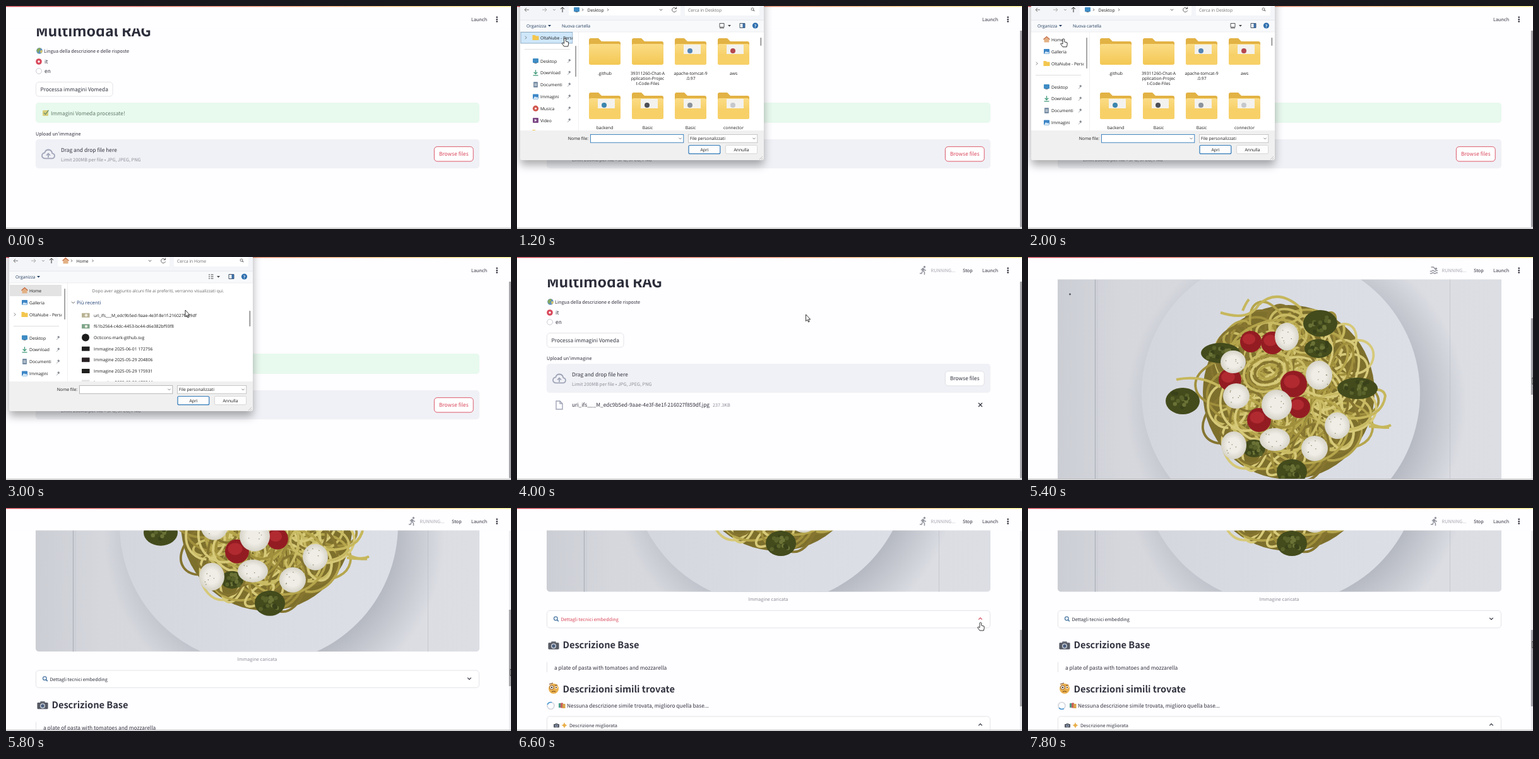
An HTML page that plays this animation: 800 px wide and 353 px high, repeating every 8000 ms.

```html
<!DOCTYPE html>
<html lang="it">
<head>
<meta charset="utf-8">
<title>Multimodal RAG</title>
<style>
html, body { margin: 0; width: 100%; height: 100%; overflow: hidden; background: #fefdff; }
svg { display: block; width: 100%; height: 100%; font-family: "Noto Sans CJK JP", "Noto Sans CJK SC", "Noto Sans CJK", sans-serif; }
text { white-space: pre; text-rendering: geometricPrecision; }
#dialog { font-family: "Open Sans", "Noto Sans", sans-serif; }
</style>
</head>
<body>
<svg id="stage" viewBox="0 0 800 353"></svg>
<script>
const INK = '#31333f', GREY = '#8d8f99', RED = '#d8475a', LINE = '#dcdde3';
const BODY = 8.37, SMALL = 7.3, UI = 6.75;

const rect = (x, y, w, h, fill, r = 0, more = '') =>
  `<rect x="${x}" y="${y}" width="${w}" height="${h}" rx="${r}" fill="${fill}" ${more}/>`;
const line = (d, stroke, w = 1, more = '') =>
  `<path d="${d}" fill="none" stroke="${stroke}" stroke-width="${w}" ${more}/>`;
const shape = (d, fill, more = '') => `<path d="${d}" fill="${fill}" ${more}/>`;
const oval = (x, y, rx, ry, fill, more = '') =>
  `<ellipse cx="${x}" cy="${y}" rx="${rx}" ry="${ry}" fill="${fill}" ${more}/>`;
const dot = (x, y, r, fill, more = '') => oval(x, y, r, r, fill, more);
const text = (x, y, size, str, fill = INK, more = '') =>
  `<text x="${x}" y="${y}" font-size="${size}" fill="${fill}" ${more}>${str}</text>`;
const group = (id, inner, more = '') => `<g id="${id}" ${more}>${inner}</g>`;
const box = (x, y, w, h, stroke = LINE, r = 4.7, fill = '#fff') =>
  rect(x, y, w, h, fill, r, `stroke="${stroke}" stroke-width=".8"`);
const chevron = (x, y, dx, dy, color = INK, w = 1.2) =>
  dx > dy ? line(`M${x - dx} ${y - dy}l${dx} ${2 * dy}l${dx} ${-2 * dy}`, color, w)
          : line(`M${x - dx} ${y - dy}l${2 * dx} ${dy}l${-2 * dx} ${dy}`, color, w);
const MID = 'text-anchor="middle"', BOLD = 'font-weight="700"', SEMI = 'font-weight="600"';

// small pictograms
const camera = (x, y, s) => `<g transform="translate(${x} ${y}) scale(${s})">` +
  rect(-4, -7, 8, 4, '#6b6f78', 1) + rect(-9, -5, 18, 11, '#565a64', 1.5) +
  dot(0, .5, 4.2, '#d3d7dd') + dot(0, .5, 2.8, '#4a5f80') + '</g>';
const lens = (x, y, r, color, w) =>
  line(`M${x + r * .6} ${y + r * .6}l${r} ${r}`, color, w * 1.3) +
  dot(x, y, r, 'none', `stroke="${color}" stroke-width="${w}"`);
const globe = dot(53, 71, 4.8, '#5c8fc4') + shape('M49 69q3-4 6-2q-1 4-3 4q1 3-1 3q-3-2-2-5z', '#86a85a') +
  shape('M54 71q3-2 4 0q-1 3-3 4z', '#d9c766');
const face = dot(58, 286, 8, '#eab04e') + dot(55, 284, 3.2, '#fff', 'stroke="#8a5a2b"') +
  dot(62, 284, 2, '#fff') + dot(55, 284, 1.3, '#4a3520') + dot(62, 284, 1.1, '#4a3520') +
  line('M55 291q3-2 6 0', '#7a4a20', 1.2) + line('M51 279l6-2M60 281l4-1', '#7a4a20', 1.2);
const books = rect(66, 309, 4, 7, '#4e9a8a', .6) + rect(69, 308.5, 4, 8, '#c4605c', .6) + rect(72, 310, 4.5, 7, '#d9a44a', .6);
const star = shape('M75 339q.8 4 4.5 5q-3.7 1-4.5 5q-.8-4-4.5-5q3.7-1 4.5-5z', '#e9b04c');

// photo of the dish
let seed = 11;
const rnd = () => (seed = seed * 16807 % 2147483647) / 2147483647;
const around = (c, spread) => (c + (rnd() - .5) * spread).toFixed(1);
const noodle = (x, y, rx, ry, turn, i) => oval(x, y, rx, ry, 'none',
  `stroke="${['#c9bb64', '#a08f3c', '#d6c978', '#857530', '#b5a54c'][i % 5]}" stroke-width="3.8" transform="rotate(${turn} ${x} ${y})"`);
function pasta() {
  let out = oval(413, 214, 136, 138, '#7d6f2c');
  for (let i = 0; i < 120; i++) {
    const a = rnd() * 6.283, rx = 24 + rnd() * 40, d = Math.sqrt(rnd()) * (150 - rx);
    out += noodle((413 + d * Math.cos(a)).toFixed(1), (213 + d * Math.sin(a)).toFixed(1),
      rx.toFixed(1), (rx * (.4 + rnd() * .5)).toFixed(1), Math.round(rnd() * 180), i);
  }
  out += line('M235 194q40-8 70 12M540 262q20 12 35 4M540 268q18 2 32 2M305 88q45 14 60-12q30-28 66 4q8 20-24 26M340 85q5-12 10-18M495 130q8-8 5-22M500 255q60 5 66-35q-2-10-14-10', '#c6b75c', 4);
  for (let i = 0; i < 5; i++) out += noodle(380, 182, 39 - i * 6, 30 - i * 5, -20, i);
  return out;
}
const pesto = [[463,105,27,21],[460,145,22,15],[305,152,31,16],[245,228,27,21],[522,208,32,17],[418,340,24,20],[358,303,18,14]];
const tomatoes = [[353,134,17],[387,136,18],[421,201,21],[430,238,17],[366,258,19],[320,194,18]];
const cheese = [[325,166,20,18],[410,126,19,22],[461,187,21,23],[330,220,21,20],[394,234,24,24],[490,267,20,21],[326,298,20,22],[391,289,24,18],[454,303,21,20]];
const crumbs = (n, [x, y, rx, ry], r, colors) => Array.from({ length: n }, (_, i) =>
  dot(around(x, rx * 1.3), around(y, ry * 1.3), r, colors[i % colors.length])).join('');
const photo = '<g transform="translate(0 237)" clip-path="url(#frame)">' +
  rect(47, 21, 703, 396, 'url(#wood)') +
  line('M106.5 20V420', '#aeb2bb', 1.4) + line('M668.5 20V420M110 20V420', '#c6c9cf') + dot(66.5, 59, 1.4, '#50535c') +
  dot(425, 235, 270, 'url(#shadow)') + dot(400.5, 216, 220.5, 'url(#plate)') +
  pasta() +
  pesto.map(p => oval(...p, '#434b1c') + crumbs(16, p, 3.2, ['#59622a', '#39411a', '#6b7236'])).join('') +
  tomatoes.map(([x, y, r]) => dot(x, y, r, '#931c22') + oval(x - 3, y - 4, r * .6, r * .5, '#b02a30')).join('') +
  cheese.map(c => oval(...c, 'url(#milk)') + crumbs(6, c, .7, ['#7d7a55'])).join('') + '</g>';

// web page
const intro = text(46.9, 47.6, 23.1, 'Multimodal RAG', '#2b2d3a', BOLD) + globe +
  text(60, 74, SMALL, 'Lingua della descrizione e delle risposte') +
  dot(52, 88, 4.8, RED) + dot(52, 88, 1.7, '#fff') + text(61, 91.3, BODY, 'it') +
  dot(52, 103, 4.4, '#fff', 'stroke="#c3c5cd" stroke-width=".9"') + text(61, 106.3, BODY, 'en') +
  box(47.4, 120.4, 121.6, 22.6) + text(54.5, 134.5, BODY, 'Processa immagini Vomeda');
const alertBox = rect(47, 153, 703, 32, '#e8f9ee', 4.7) +
  rect(58, 165, 9, 9, '#d8cf7c', 1.5) + line('M60 169l2.5 2.5l5-6.5', '#71936f', 1.3) +
  text(71, 172.5, BODY, 'Immagini Vomeda processate!', '#5f7a66');
const uploader = text(47, 204.8, SMALL, "Upload un'immagine") + rect(47, 211, 703, 46, '#f0f1f6', 4.7) +
  line('M61.5 241.3q-4.5-.3-4.5-4.5q.2-4 4.300-4.5q1.5-4.800 6-4.800q5 .3 6 5.800q3.700.5 3.700 4q-.3 3.700-3.800 4z'.replace(/00/g, ''), '#a0a5b8', 1.8) +
  line('M67 240v-6.5m-3 3l3-3l3 3', '#a0a5b8', 1.7) +
  text(87, 230.9, BODY, 'Drag and drop file here') +
  text(87, 245.5, SMALL, 'Limit 200MB per file • JPG, JPEG, PNG', GREY) +
  '<rect id="browseBox" x="678.4" y="222.7" width="61.8" height="23.2" rx="4.7" fill="#fff" stroke-width=".9"/>' +
  `<text id="browseText" x="709.3" y="237.2" font-size="${BODY}" ${MID}>Browse files</text>`;
const fileRow = line('M62 228h6l4 4v9h-10zM68 228v4h4', '#a0a5b8', 1.4) +
  text(87, 236.8, BODY, 'uri_ifs___M_edc9b5ed-9aae-4e3f-8e1f-216027f859df.jpg') +
  text(310, 236.6, SMALL, '237.3KB', GREY) + line('M731 231l6 6m0-6l-6 6', INK, 1.2);
const results = text(398, 147.3, SMALL, 'Immagine caricata', GREY, MID) +
  box(47.4, 162.4, 702, 27.4) + lens(61.3, 175, 2.8, '#4d7aa5', 1.3) +
  `<text id="details" x="69.5" y="179" font-size="${SMALL}">Dettagli tecnici embedding</text>` +
  group('open', chevron(734, 175.3, 2.8, -1.4, RED)) + group('shut', chevron(734, 175.3, 2.8, 1.4)) +
  camera(58, 218, .95) + text(72.5, 222, 14.6, 'Descrizione Base', INK, SEMI) +
  line('M47.5 244v16', '#e3e4e9') + text(59, 256, BODY, 'a plate of pasta with tomatoes and mozzarella') +
  face + text(72.5, 291.5, 14.6, 'Descrizioni simili trovate', INK, SEMI) +
  dot(53.5, 313, 5.5, 'none', 'stroke="#d5d8e0" stroke-width="1.7"') +
  group('spinner', line('M53.5 307.5a5.5 5.5 0 0 1 5.5 5.5', '#4f9bd6', 1.7)) + books +
  text(79, 316.3, BODY, 'Nessuna descrizione simile trovata, miglioro quella base...') +
  box(47.4, 329.9, 702, 40) + camera(62.5, 344.5, .5) + star +
  text(83, 347, SMALL, 'Descrizione migliorata') + chevron(734, 343, 2.8, -1.4);
const header = rect(0, 0, 800, 35.5, '#fefdff') + rect(0, 0, 800, 1.3, 'url(#bar)') +
  text(737, 24, SMALL, 'Launch') + [17.8, 21.2, 24.6].map(y => dot(777.7, y, 1.3, INK)).join('') +
  group('busy', text(655.5, 24, SMALL, 'RUNNING...', '#a6a8b0') + text(706, 24, SMALL, 'Stop') +
    group('run', dot(645.5, 15.8, 1.7, '#92949d') +
      line('M644 18l-1.5 4.5', '#92949d', 3) +
      line('M643 22l2.5 2v4M642 23l-1 3h-3M640 20.5l3-2.5l3 3h2', '#92949d', 1.5)) +
    group('swim', dot(646.5, 18.3, 1.6, '#92949d') +
      line('M638.5 16h4l3.5 4.5M637 22q1.500 1.500 3 0t3 0t3 0t3 0M637 25.5q1.500 1.500 3 0t3 0t3 0t3 0'.replace(/00/g, ''), '#92949d', 1.4)));

// file picker
const folderIcon = (x, y) => shape(`M${x - 5} ${y - 4}h4l1.5 1.5h4.5v6.5h-10z`, '#f3c64e');
const homeIcon = (x, y) => shape(`M${x - 4} ${y}v4.5h8v-4.5l-4-4z`, '#e3b184') + line(`M${x - 5} ${y}l5-4.5l5 4.5`, '#c4683f', 1.3);
const screenIcon = (x, y) => rect(x - 4.5, y - 4, 9, 7, '#3f8cc4', 1) + rect(x - 2, y + 3, 4, 1, '#69747e');
const pictureIcon = (x, y) => rect(x - 4.5, y - 4, 9, 8, '#3d86c6', 1) + shape(`M${x - 4} ${y + 3.5}l3-4l2 2l1.5-1.5l2 3.5z`, '#dcecf8');
const icons = {
  Home: homeIcon, Galleria: pictureIcon, Desktop: screenIcon, Immagini: pictureIcon,
  Download: (x, y) => line(`M${x} ${y - 4.5}v6m-2.8-2.5l2.8 2.8l2.8-2.8M${x - 4} ${y + 4}h8`, '#3f9a78', 1.3),
  Documenti: (x, y) => rect(x - 3.5, y - 4.5, 7, 9, '#7d93a8', 1) + line(`M${x - 2} ${y - 1}h4m-4 2h4`, '#fff', .8),
  Musica: (x, y) => dot(x, y, 4.6, '#d0584f') + dot(x, y, 1.5, '#fff'),
  Video: (x, y) => rect(x - 4.5, y - 4, 9, 8, '#7d4a86', 1) + shape(`M${x - 1.5} ${y - 2}l3.5 2l-3.5 2z`, '#fff')
};
const place = (name, y, pin) => icons[name](29.5, y) + text(37, y + 2.5, UI, name, '#1b1b1b') +
  (pin ? line(`M80 ${y + 3}l3-3`, '#8a8f96', .8) + line(`M82 ${y - .5}l2.5-1.5`, '#8a8f96', 3) : '');
const sidebar = group('homeMark', rect(6, 44, 82, 18, '#e3e3e3')) +
  group('cloudMark', rect(6, 82.5, 82, 17.5, '#cfe7fa', 0, 'stroke="#7a9db8" stroke-width=".8"')) +
  place('Home', 53) + place('Galleria', 72) + chevron(14, 91, 1.2, 2.4, '#666', .8) + folderIcon(29.5, 91) +
  text(37, 93.5, UI, 'OltaNube - Personale', '#1b1b1b') + line('M12 109.5h72', '#d6d6d6', .8) +
  ['Desktop', 'Download', 'Documenti', 'Immagini', 'Musica', 'Video'].map((n, i) => place(n, 128 + i * 18.8, true)).join('') +
  folderIcon(29.5, 241);

function folder(x, y, lines, mark) {
  const label = lines.map((s, i) => text(x, y + 57.5 + i * 8.3, UI, s, '#1b1b1b', MID)).join('');
  return shape(`M${x - 25} ${y + 3}q0-3 3-3h12l5 5h27q3 0 3 3v20h-50z`, '#e2b244') +
    rect(x - 25, y + 9, 50, 33, 'url(#fold)', 3) +
    (mark ? rect(x - 11, y + 10, 27, 19, '#f3f2ee', 1) + dot(x - 1, y + 20, 4, mark) +
      rect(x - 25, y + 25, 50, 17, '#f7d068', 3) : '') + label;
}
const column = i => 139 + i * 68;
const desktopView = [[['.github']], [['39311260-Chat-A', 'pplication-Projec', 't-Code-Files']],
    [['apache-tomcat-9', '.0.97'], '#5585b5'], [['aws'], '#b5484f']].map((f, i) => folder(column(i), 51, ...f)).join('') +
  [['backend', '#3c86ae'], ['Basic', '#4c4f55'], ['Basic', '#8a929c'], ['connector', '#c5c8cc']]
    .map(([n, m], i) => folder(column(i), 137, [n], m)).join('') + rect(385.5, 50, 1.7, 13, '#8a8a8a', 1);

const recent = ['uri_ifs___M_edc9b5ed-9aae-4e3f-8e1f-216027f859df', 'f61b2564-c4dc-4453-bc44-d6e382bf93f8', 'Octicons-mark-github.svg',
  'Immagine 2025-06-01 172756', 'Immagine 2025-05-29 204806', 'Immagine 2025-05-29 175931', 'Immagine 2025-05-29 173844'];
const thumbs = ['#b9b295', '#7fa58a', '', '#1f1f1f', '#292224', '#20201f', '#e4e4e4'];
const homeView = text(241, 55.5, UI, 'Dopo aver aggiunto alcuni file ai preferiti, verranno visualizzati qui.', '#6a6a6a', MID) +
  chevron(106.5, 72, 2.6, 1.3, '#555', .9) + text(112, 75, 7.8, 'Più recenti', '#1f3f74') +
  group('pick', rect(104, 84, 276, 17, '#cce8ff')) +
  recent.map((name, i) => {
    const y = 92.2 + i * 17.65;
    const icon = i === 2 ? dot(126, y, 6, '#1c1c1c') : rect(120, y - 3.5, 12.5, 7, thumbs[i], .5) + (i < 2 ? dot(127, y, 2.2, '#f0eee2') : '');
    return icon + text(139, y + 2.5, UI, name, '#1b1b1b');
  }).join('') + rect(385.5, 85, 1.7, 25, '#8a8a8a', 1);

const crumb = (id, icon, name, end) => group(id, icon(94.5, 6) + chevron(104, 6, .9, 1.8, '#444', .8) +
  text(111.5, 8.5, UI, name, '#1b1b1b') + chevron(end, 6, .9, 1.8, '#444', .8) + text(271, 8.5, UI, 'Cerca in ' + name, '#6c6c6c'));
const dialog = rect(5, -20, 386, 264, '#f0f0f0', 4, 'filter="url(#shade)"') +
  rect(5, 0, 386, 22, '#f3f5f8') + rect(82, -6, 177, 21, '#fff', 2) + rect(266, -6, 118, 21, '#fff', 2) +
  line('M19 6h-7m3-3l-3 3l3 3', '#777') + line('M40 6h7m-3-3l3 3l-3 3', '#aaa') + line('M72 10v-8m-3 3l3-3l3 3', '#333') +
  chevron(59, 6, 1.8, .9, '#777', .8) + chevron(228, 6, 2.2, 1.1, '#555', .9) +
  line('M252 4a3.5 3.5 0 1 0 .5 3M252.5 1.5v3h-3', '#555', .9) + lens(373, 5, 2, '#555', .8) +
  crumb('pathDesktop', screenIcon, 'Desktop', 144) + crumb('pathHome', homeIcon, 'Home', 137.5) +
  rect(5, 22, 386, 19, '#f8f9fb') + line('M5 22.3h386M5 41h386', '#e3e5e9', .8) +
  text(15, 33.5, UI, 'Organizza', '#1e395b') + shape('M49 30h5l-2.5 2.7z', '#1e395b') +
  group('newDir', text(71, 33.5, UI, 'Nuova cartella', '#1e395b') + line('M321 27.5h7v6h-7zM321 35h7', '#444', .9)) +
  group('listIcon', line('M321 28h2m1.5 0h4M321 31h2m1.5 0h4M321 34h2m1.5 0h4', '#444', 1)) +
  shape('M334 30h5l-2.5 2.7z', '#444') + line('M353 27.5h8v7h-8z', '#345', .9) + rect(357.5, 27.5, 3.5, 7, '#3c6ea5') +
  dot(377.5, 31, 4.6, '#2f6fae') + text(377.5, 33.5, 6.5, '?', '#fff', MID + ' ' + BOLD) +
  rect(5, 41.4, 386, 155.6, '#fff') +
  `<g clip-path="url(#side)">${group('sidebar', sidebar)}</g>` +
  group('sideThumb', rect(92.3, 50, 1.5, 49, '#8a8a8a', .7)) + line('M97.5 41v156', '#ececec', .8) +
  `<g clip-path="url(#files)">${group('desktopView', desktopView)}${group('homeView', homeView)}</g>` +
  text(113, 211.7, UI, 'Nome file:', '#1b1b1b', 'text-anchor="end"') +
  '<rect id="nameBox" x="116.4" y="203.4" width="147.4" height="12.8" fill="#fff" stroke-width=".9"/>' +
  chevron(258.5, 209.7, 2, 1, '#555', .8) + box(271.4, 203.4, 109.4, 12.8, '#b9b9b9', 0) +
  text(274, 211.7, UI, 'File personalizzati', '#1b1b1b') + chevron(375.5, 209.7, 2, 1, '#555', .8) +
  rect(272, 220.5, 49.8, 13.4, '#fdfdfd', 2, 'stroke="#2f78b8" stroke-width="1.2"') + text(297, 229.5, UI, 'Apri', '#1b1b1b', MID) +
  box(330.4, 220.4, 50.2, 13.4, '#cfcfcf', 2, '#fdfdfd') + text(355.5, 229.5, UI, 'Annulla', '#1b1b1b', MID) +
  line('M384 243l5-5m-2 5l2-2', '#b5b5b5', .8);

const pen = 'stroke="#222" stroke-width=".9" stroke-linejoin="round"';
const pointer = group('arrow', shape('M0 0V10.5L2.4 8.3L4 12L5.6 11.3L4 7.8H7.2Z', '#fff', pen)) +
  group('hand', shape('M-1.5 1Q0-1 1.3 1V5L5.5 6.2Q6.2 8.5 4.8 13H-1.5L-5 8Q-4.5 6.3-1.5 8.3Z', '#fff', pen));

const stops = (...list) => list.map(([o, c, a = 1]) => `<stop offset="${o}" stop-color="${c}" stop-opacity="${a}"/>`).join('');
const clip = (id, ...r) => `<clipPath id="${id}">${rect(...r)}</clipPath>`;
document.getElementById('stage').innerHTML = '<defs>' +
  `<linearGradient id="bar">${stops([0, '#d0434f'], [.5, '#e58a68'], [1, '#f4ea86'])}</linearGradient>` +
  `<linearGradient id="wood">${stops([0, '#cbced4'], [.15, '#d5d7dd'], [1, '#dcdee4'])}</linearGradient>` +
  `<linearGradient id="plate">${stops([0, '#d4d6dd'], [.5, '#d9dce3'], [1, '#dcdfe6'])}</linearGradient>` +
  `<linearGradient id="fold" x2="0" y2="1">${stops([0, '#fbdc85'], [1, '#f3c753'])}</linearGradient>` +
  `<radialGradient id="shadow">${stops([.7, '#a9adb7', .75], [1, '#a9adb7', 0])}</radialGradient>` +
  `<radialGradient id="milk">${stops([.5, '#efede6'], [1, '#d6d3c8'])}</radialGradient>` +
  '<filter id="shade" x="-10%" y="-10%" width="120%" height="130%"><feDropShadow dx="0" dy="8" stdDeviation="7" flood-opacity=".32"/></filter>' +
  clip('frame', 47, 21, 703, 395.5, '#000', 4.7) + clip('side', 5, 41, 83.5, 156, '#000') + clip('files', 98, 41, 292, 156, '#000') +
  '</defs>' + rect(0, 0, 800, 353, '#fefdff') +
  group('page', intro + group('alert', alertBox) + group('uploader', uploader) + group('file', fileRow) +
    group('photo', photo) + group('results', results, 'transform="translate(0 521)"')) +
  header + rect(0, 351, 800, 2, '#fefdff') + rect(0, 351, 800, 1.3, '#b8b8bb') +
  group('track', rect(796.8, 36, 3.2, 315, '#ececef')) +
  '<rect id="thumb" x="796.8" width="3.2" fill="#a4a4a8"/>' + group('dialog', dialog) + group('pointer', pointer);

const $ = id => document.getElementById(id);
const set = (id, name, value) => $(id).setAttribute(name, value);
const show = (id, on) => set(id, 'display', on ? 'inline' : 'none');
const move = (id, x, y) => set(id, 'transform', `translate(${x} ${y})`);
// linear keys: [time, value, ...]
function at(keys, t) {
  const i = keys.findIndex(k => k[0] > t);
  if (i <= 0) return (i ? keys[keys.length - 1] : keys[0]).slice(1);
  const a = keys[i - 1], b = keys[i], p = (t - a[0]) / (b[0] - a[0]);
  return a.slice(1).map((v, j) => v + (b[j + 1] - v) * p);
}
const path = [[600, 500, 180], [1200, 76, 51], [1400, 76, 51], [2200, 50, 52], [2400, 60, 55], [3000, 284, 84], [3200, 230, 91],
  [3600, 230, 91], [4600, 799, 91], [4800, 799, 91], [5400, 799, 191], [6000, 799, 287], [6600, 734.5, 181], [6800, 734.5, 181], [7400, 799, 211]];
const travel = [[4800, 0, 37], [5400, 237, 97], [6000, 521, 193]];

function draw(t) {
  const picking = t >= 400 && t < 3600, loaded = t >= 3800, home = t >= 2200, grown = t >= 4200;
  const [scroll, top] = at(travel, t), [x, y] = at(path, t);
  move('page', 0, -scroll);
  move('uploader', 0, loaded ? -42 : 0);
  show('alert', !loaded);
  show('file', loaded);
  show('busy', loaded);
  show('photo', grown);
  show('results', t >= 4800);
  const swim = t >= 5200 && t < 5800;
  show('swim', swim);
  show('run', !swim);
  set('browseBox', 'stroke', loaded ? LINE : RED);
  set('browseText', 'fill', loaded ? INK : RED);

  show('track', grown);
  show('thumb', t >= 400);
  set('thumb', 'y', grown ? top : 39);
  set('thumb', 'height', grown ? 121 : 311);

  show('dialog', picking);
  const [side] = at([[1400, 41], [2000, 0]], t);
  move('sidebar', 0, -side);
  move('sideThumb', 0, side * .32);
  show('cloudMark', t < 1800);
  show('homeMark', home);
  for (const id of ['homeView', 'pathHome', 'listIcon']) show(id, home);
  for (const id of ['desktopView', 'pathDesktop', 'newDir']) show(id, !home);
  show('pick', t >= 3200);
  set('nameBox', 'stroke', home ? '#b0b0b0' : '#2f78b8');

  const over = t >= 6400 && t < 7000, open = t >= 6600 && t < 6800;
  set('details', 'fill', over ? RED : INK);
  show('open', open);
  show('shut', !open);
  set('spinner', 'transform', `rotate(${t * .48 % 360} 53.5 313)`);

  const hand = t >= 1200 && t < 2400 || t >= 6600 && t < 7000;
  show('pointer', t >= 600);
  move('pointer', x, y);
  show('hand', hand);
  show('arrow', !hand);
}
const STEP = 200, LOOP = 8000, start = performance.now();
function tick() {
  draw(Math.floor((performance.now() - start) % LOOP / STEP) * STEP);
  requestAnimationFrame(tick);
}
tick();
</script>
</body>
</html>
```
